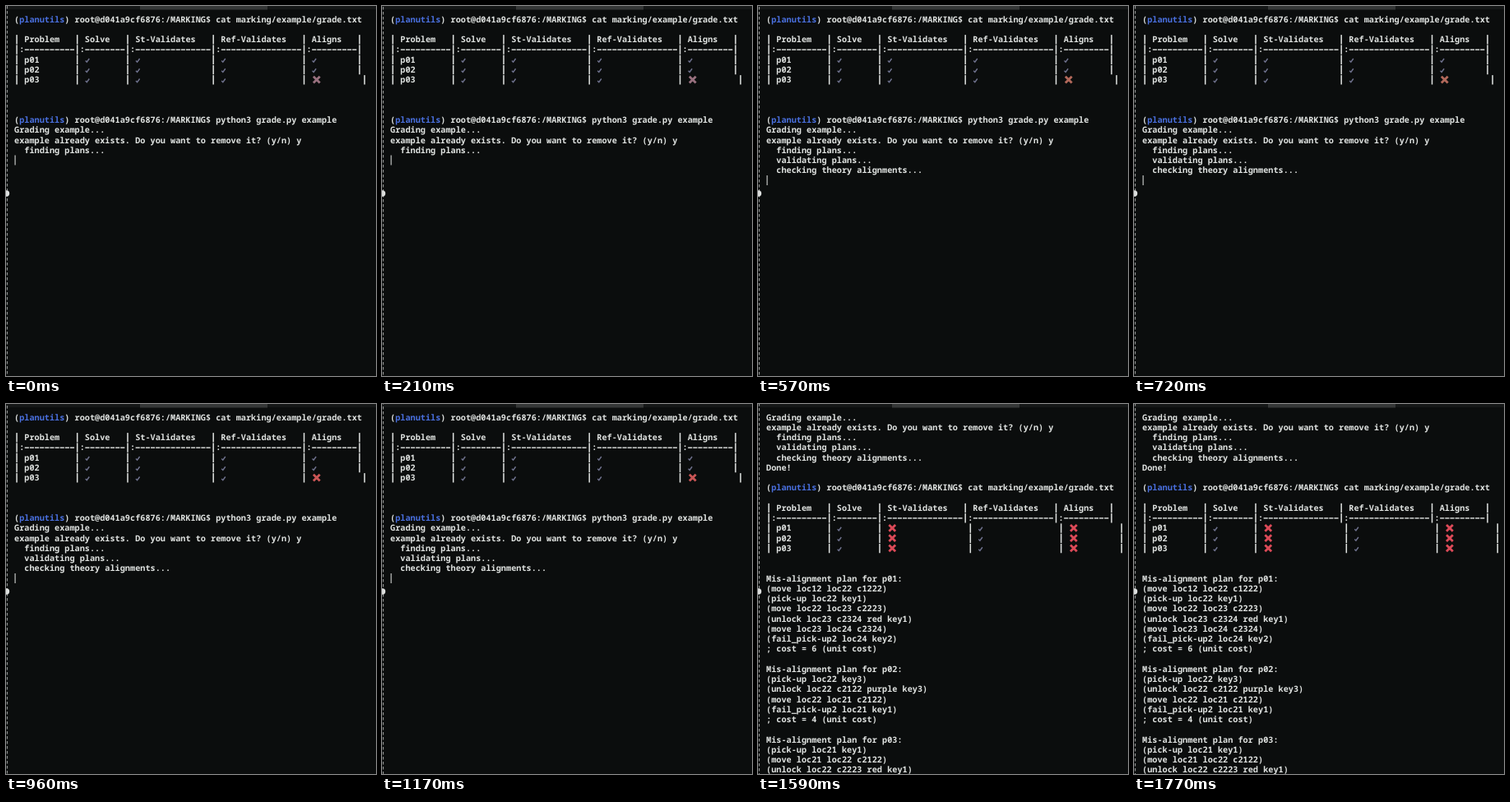
Animation of 450 by 450 pixels, one loop 1800 ms. Source, as an HTML page with a canvas:

```html
<!DOCTYPE html>
<html lang="en">
<head>
<meta charset="utf-8">
<title>Terminal</title>
<style>
  html, body { margin: 0; width: 100%; height: 100%; overflow: hidden; background: #0b0d0d; }
  canvas { display: block; width: 450px; height: 450px; filter: blur(0.4px); }
</style>
</head>
<body>
<canvas id="stage" width="450" height="450"></canvas>
<script>
const ctx = document.getElementById('stage').getContext('2d');

const LOOP = 1800, STEP = 30;
const VALIDATE = 270, CHECK = 570, RESULT = 1260;
const LEFT = 10, TOP = 16, CW = 6.13, LH = 12.25;
const INK = '#e0e3e1', BLUE = '#4a70e0', BG = '#0b0d0d';
const FONT = '10.2px "Noto Sans Mono", "DejaVu Sans Mono", monospace';

const PROMPT = '(planutils) root@d041a9cf6876:/MARKING$ ';
const CAT = PROMPT + 'cat marking/example/grade.txt';
const HEADS = ['Problem', 'Solve', 'St-Validates', 'Ref-Validates', 'Aligns'];

// Rows of the form "#p01 yyny" are table rows: y is a tick, n a cross.
const table = marks => [
  '| ' + HEADS.join('   | ') + '   |',
  '|' + HEADS.map(h => ':' + '–'.repeat(h.length + 3)).join('|') + '|',
  ...marks.map((m, i) => `#p0${i + 1} ${m}`)
];

const ASK = ['Grading example...', 'example already exists. Do you want to remove it? (y/n) y'];
const STAGES = ['  finding plans...', '  validating plans...', '  checking theory alignments...'];

const RUN = [
  CAT, '', ...table(['yyyy', 'yyyy', 'yyyn']), '', '', '',
  PROMPT + 'python3 grade.py example', ...ASK
];

const DONE = [
  ...ASK, ...STAGES, 'Done!', '', CAT, '',
  ...table(['ynyn', 'ynyn', 'ynyn']), '', '',
  'Mis-alignment plan for p01:',
  '(move loc12 loc22 c1222)',
  '(pick-up loc22 key1)',
  '(move loc22 loc23 c2223)',
  '(unlock loc23 c2324 red key1)',
  '(move loc23 loc24 c2324)',
  '(fail_pick-up2 loc24 key2)',
  '; cost = 6 (unit cost)', '',
  'Mis-alignment plan for p02:',
  '(pick-up loc22 key3)',
  '(unlock loc22 c2122 purple key3)',
  '(move loc22 loc21 c2122)',
  '(fail_pick-up2 loc21 key1)',
  '; cost = 4 (unit cost)', '',
  'Mis-alignment plan for p03:',
  '(pick-up loc21 key1)',
  '(move loc21 loc22 c2122)',
  '(unlock loc22 c2223 red key1)'
];

const colX = col => LEFT + col * CW;
const rowY = row => TOP + row * LH;

function rect(x, y, w, h, color) {
  ctx.fillStyle = color;
  ctx.fillRect(x, y, w, h);
}

function path(points, width, color) {
  ctx.strokeStyle = color;
  ctx.lineWidth = width;
  ctx.beginPath();
  points.forEach(([x, y], i) => i ? ctx.lineTo(x, y) : ctx.moveTo(x, y));
  ctx.stroke();
}

function bar(col, row) {
  rect(colX(col + 0.5) - 0.7, rowY(row) - 5.4, 1.5, 11.4, INK);
}

function print(text, row, col = 0) {
  const named = text.startsWith(PROMPT);
  [...text].forEach((ch, i) => {
    if (ch === ' ') return;
    if (ch === '|') return bar(col + i, row);
    if (ch === '–') return rect(colX(col + i) + 0.5, rowY(row) - 0.3, CW - 1, 1.4, INK);
    const blue = named && i > 0 && i < 10;
    ctx.font = '700 ' + FONT;
    ctx.fillStyle = blue ? BLUE : INK;
    ctx.fillText(ch, colX(col + i + 0.5), rowY(row) + 3.7);
  });
}

function tick(col, row) {
  const x = colX(col + 0.5), y = rowY(row) + 1;
  path([[x - 2.2, y + 0.6], [x - 0.6, y + 2.2], [x + 2.4, y - 2]], 1.4, '#70738f');
}

function cross(col, row, color) {
  const x = colX(col + 1), y = rowY(row) + 0.2, r = 3.9;
  path([[x - r, y - r], [x + r, y + r]], 2.8, color);
  path([[x + r, y - r], [x - r, y + r]], 2.8, color);
}

// A cross is two cells wide, so it pushes the rest of its row to the right.
function tableRow(text, row, red) {
  const [name, marks] = text.slice(1).split(' ');
  let col = 0;
  bar(col, row);
  print(name, row, 2);
  HEADS.forEach((head, i) => {
    const mark = marks[i - 1];
    if (mark === 'y') tick(col + 2, row);
    if (mark === 'n') cross(col + 2, row, red);
    col += head.length + 5 + (mark === 'n' ? 1 : 0);
    bar(col, row);
  });
}

function crossColor(t) {
  if (t >= RESULT) return '#dc4a58';
  if (t >= 960) return '#cb5656';
  if (t >= CHECK) return '#b3695b';
  return t >= VALIDATE ? '#a9989d' : '#99717f';
}

function frameEdge(t) {
  rect(0, 0, 450, 4, '#151717');
  rect(163, 0, 155, 4.5, '#353737');

  ctx.setLineDash([3.5, 2.5]);
  ctx.lineDashOffset = -t / STEP;
  path([[1.5, 0], [1.5, 450]], 1.2, '#8f9190');
  ctx.setLineDash([]);

  ctx.fillStyle = '#dcdedd';
  ctx.beginPath();
  ctx.arc(0.5, 228, 3.7, 0, Math.PI * 2);
  ctx.fill();
}

function draw(t) {
  rect(0, 0, 450, 450, BG);
  frameEdge(t);
  ctx.textAlign = 'center';
  ctx.textBaseline = 'alphabetic';
  if ('textRendering' in ctx) ctx.textRendering = 'geometricPrecision';

  const done = t >= RESULT;
  const count = t >= CHECK ? 3 : t >= VALIDATE ? 2 : 1;
  const lines = done ? DONE : [...RUN, ...STAGES.slice(0, count)];
  const red = crossColor(t);
  lines.forEach((line, row) => line[0] === '#' ? tableRow(line, row, red) : print(line, row));
  if (!done) rect(LEFT + 0.5, rowY(lines.length) - 6, 1.2, 12, '#c4c6c5');
}

const start = performance.now();
function run(now) {
  const t = Math.max(0, now - start) % LOOP;
  draw(Math.floor(t / STEP) * STEP);
  requestAnimationFrame(run);
}
draw(0);
requestAnimationFrame(run);
</script>
</body>
</html>
```
